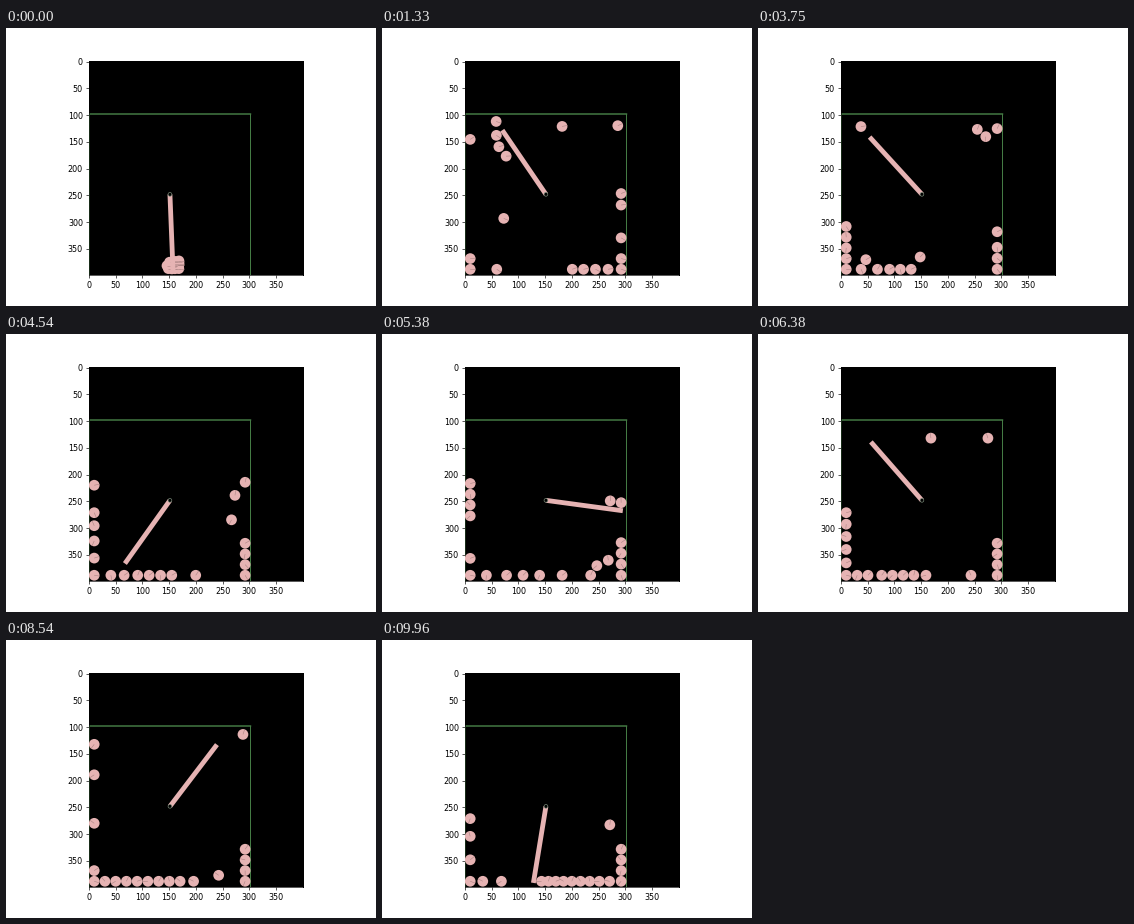
These frames come from a looping animation (370x278 px, 10000 ms). A matplotlib script:

```python
import numpy as np
import matplotlib.pyplot as plt
from matplotlib.animation import FuncAnimation
from matplotlib.collections import LineCollection
from matplotlib.patches import Circle, Polygon

FRAMES, LOOP_MS = 240, 10000
DPI = 57.8125
PIXEL = 72 / DPI  # one pixel in points
PINK, SPOKE, GREEN = "#e6b3b3", "#ac8484", "#447b44"

# World units: a 400 x 400 screen, y pointing down
LEFT, RIGHT, TOP, FLOOR = 0, 302, 97.87, 398
PIVOT = np.array([151.5, 248.0])
LENGTH, HALF = 145, 4.5
R, COUNT = 10, 20
GRAVITY, MAX_SPEED, MAX_PUSH, SUBSTEPS = 0.3, 13, 0.5, 4

# The motor labours under the balls: its angle (degrees) at a few frames
key_frames = np.array([0, 60, 90, 129, 175, 204, 239])
key_angles = np.radians([87.7, -314.7, -492.4, -712.3, -976.5, -1132.7, -1340.7])
key_rates = np.gradient(key_angles, key_frames)


def paddle_angle(t):
    """Cubic Hermite curve through the motor angles."""
    k = int(np.clip(np.searchsorted(key_frames, t) - 1, 0, len(key_frames) - 2))
    span = key_frames[k + 1] - key_frames[k]
    s = (t - key_frames[k]) / span
    ease = s * s * (3 - 2 * s)
    return (key_angles[k] * (1 - ease) + key_angles[k + 1] * ease
            + span * key_rates[k] * s * (1 - s) ** 2
            - span * key_rates[k + 1] * s * s * (1 - s))


def direction(a):
    return np.array([np.cos(a), np.sin(a)])


def resolve(p, angle, rounds=3):
    """Push balls out of each other, the paddle and the walls."""
    axis = direction(angle)
    for _ in range(rounds):
        gap = p[:, None] - p[None]
        dist = np.hypot(gap[..., 0], gap[..., 1]) + 1e-9
        push = np.where(dist < 2 * R, 0.25 * (2 * R - dist) / dist, 0)
        np.fill_diagonal(push, 0)
        shift = (gap * push[..., None]).sum(1)
        p = p + np.clip(shift, -MAX_PUSH, MAX_PUSH)

        along = np.clip((p - PIVOT) @ axis, 0, LENGTH)
        off = p - PIVOT - along[:, None] * axis
        dist = np.hypot(off[:, 0], off[:, 1]) + 1e-9
        depth = np.maximum(R + HALF - dist, 0)
        p = p + off * (depth / dist)[:, None]
        p = np.clip(p, [LEFT + R, TOP + R], [RIGHT - R, FLOOR - R])
    return p


def step(p, v, frame):
    h = 1 / SUBSTEPS
    for i in range(1, SUBSTEPS + 1):
        v = v + [0, GRAVITY * h]
        moved = resolve(p + v * h, paddle_angle(frame + i * h))
        v = (moved - p) / h
        speed = np.hypot(v[:, 0], v[:, 1]) + 1e-9
        v = v * np.minimum(1, MAX_SPEED / speed)[:, None]
        p = moved
    return p, v


def simulate(p):
    path, v = [p], np.zeros_like(p)
    for frame in range(FRAMES - 1):
        p, v = step(p, v, frame)
        path.append(p)
    return path


rng = np.random.default_rng(4)
path = simulate(rng.uniform([141, 371], [169, 388], (COUNT, 2)))
spin = rng.uniform(-0.02, 0.02, COUNT)

fig = plt.figure(figsize=(370 / DPI, 278 / DPI), dpi=DPI, facecolor="white")
ax = fig.add_axes([0.125, 0.11, 0.775, 0.77], facecolor="black")
ax.set_aspect("equal")
ax.set(xlim=(-0.5, 399.5), ylim=(399.5, -0.5),
       xticks=range(0, 400, 50), yticks=range(0, 400, 50))
ax.spines["right"].set_linewidth(PIXEL)

for x in (LEFT, RIGHT):
    ax.plot([x, x], [TOP, FLOOR], color=GREEN, lw=PIXEL)
ax.plot([LEFT, RIGHT], [TOP, TOP], color=GREEN, lw=1.5 * PIXEL, snap=False)

balls = [ax.add_patch(Circle((0, 0), R, fc=PINK, lw=0, zorder=3))
         for _ in range(COUNT)]
spokes = ax.add_collection(LineCollection([], colors=SPOKE, lw=0.7, zorder=4))
paddle = ax.add_patch(Polygon(np.zeros((4, 2)), fc=PINK, lw=0, zorder=5))
ax.add_patch(Circle(PIVOT, 3.5, fc="black", ec="#7d8f7d", lw=0.8, zorder=6))


def draw(frame):
    centres = path[frame]
    for ball, centre in zip(balls, centres):
        ball.center = centre
    rims = centres + R * direction(spin * frame).T
    spokes.set_segments(np.stack([centres, rims], axis=1))

    axis = direction(paddle_angle(frame))
    side = HALF * np.array([-axis[1], axis[0]])
    tip = PIVOT + LENGTH * axis
    paddle.set_xy([PIVOT + side, tip + side, tip - side, PIVOT - side])
    return [*balls, spokes, paddle]


anim = FuncAnimation(fig, draw, frames=FRAMES, interval=LOOP_MS / FRAMES,
                     repeat=True, repeat_delay=0, blit=False)
plt.show()
```
